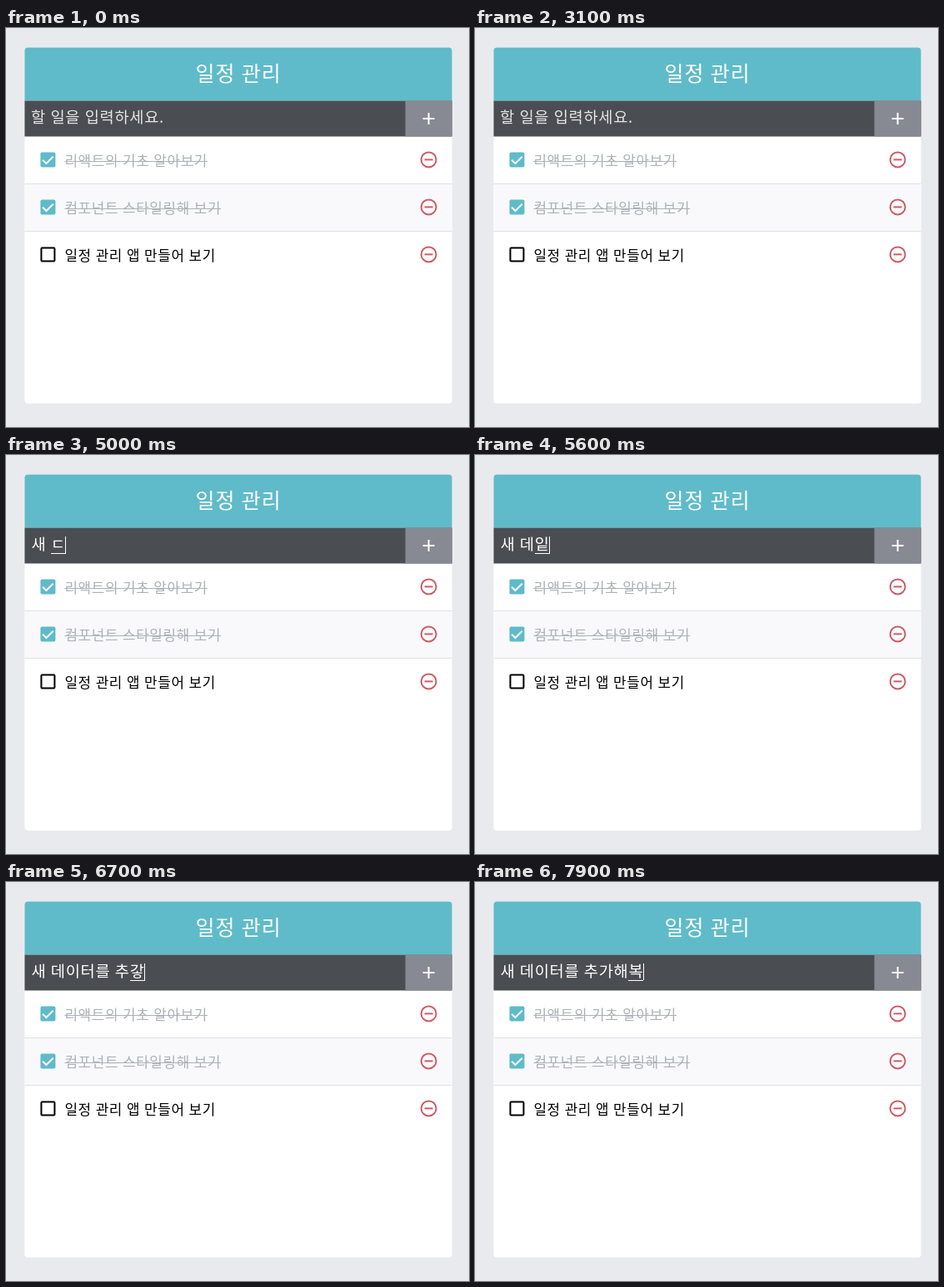
Recreate the animation shown at these times as an HTML page with a canvas. Size 556x480 px, loop 8000 ms.

```html
<!DOCTYPE html>
<html lang="ko">
<head>
<meta charset="utf-8">
<title>일정 관리</title>
<style>
  html, body { margin: 0; width: 100%; height: 100%; overflow: hidden; background: #e9eaee; }
  canvas { display: block; }
</style>
</head>
<body>
<canvas id="stage" width="556" height="480"></canvas>
<script>
const ctx = document.getElementById('stage').getContext('2d');
const LOOP = 8000;
const BLINK = 500;
const FOCUS = 2500;
const PLACEHOLDER = '할 일을 입력하세요.';

// Layout of the card
const LEFT = 22.4, RIGHT = 535.6, WIDTH = RIGHT - LEFT;
const TOP = 23.4, FORM = TOP + 64, LIST = FORM + 43;
const ROW = 57;
const ICON_X = RIGHT - 28;

const todos = [
  { text: '리액트의 기초 알아보기', done: true },
  { text: '컴포넌트 스타일링해 보기', done: true },
  { text: '일정 관리 앱 만들어 보기', done: false }
];

// Each key press: time, committed text, syllable still being composed
const keys = [
  [FOCUS, '', ''],
  [3300, '', 'ㅅ'],
  [3400, '', '새'],
  [3600, '새 ', ''],
  [3800, '새 ', 'ㄷ'],
  [4000, '새 ', '대'],
  [5000, '새 ', 'ㄷ'],
  [5200, '새 ', '데'],
  [5400, '새 ', '뎅'],
  [5500, '새 데', '이'],
  [5600, '새 데', '잍'],
  [5700, '새 데이', '터'],
  [5900, '새 데이', '털'],
  [6000, '새 데이터', '를'],
  [6100, '새 데이터를 ', ''],
  [6300, '새 데이터를 ', 'ㅊ'],
  [6400, '새 데이터를 ', '추'],
  [6500, '새 데이터를 ', '축'],
  [6600, '새 데이터를 추', '가'],
  [6700, '새 데이터를 추', '갛'],
  [6800, '새 데이터를 추가', '해'],
  [7300, '새 데이터를 추가', '햅'],
  [7700, '새 데이터를 추가해', '보'],
  [7900, '새 데이터를 추가해', '복']
];

function rect(x, y, w, h, color, radii = 0) {
  ctx.fillStyle = color;
  ctx.beginPath();
  ctx.roundRect(x, y, w, h, radii);
  ctx.fill();
}

function label(text, x, y, size, color) {
  ctx.font = `${size}px "Noto Sans CJK KR", "Noto Sans CJK", "Noto Sans CJK JP", sans-serif`;
  ctx.letterSpacing = size * 0.037 + 'px';
  ctx.wordSpacing = size * 0.033 + 'px';
  ctx.fillStyle = color;
  ctx.fillText(text, x, y);
  return ctx.measureText(text).width;
}

function line(points, color, width) {
  ctx.strokeStyle = color;
  ctx.lineWidth = width;
  ctx.beginPath();
  points.forEach(([x, y]) => ctx.lineTo(x, y));
  ctx.stroke();
}

function checkbox(cx, cy, done) {
  if (done) {
    rect(cx - 9, cy - 9, 18, 18, '#5fbbc9', 2);
    line([[cx - 6.3, cy + 0.3], [cx - 2, cy + 4.6], [cx + 6.3, cy - 3.7]], '#fff', 2);
  } else {
    ctx.strokeStyle = '#000';
    ctx.lineWidth = 2;
    ctx.beginPath();
    ctx.roundRect(cx - 8, cy - 8, 16, 16, 1);
    ctx.stroke();
  }
}

function removeIcon(cx, cy) {
  const color = '#cf5b66';
  ctx.strokeStyle = color;
  ctx.lineWidth = 2;
  ctx.beginPath();
  ctx.arc(cx, cy, 9, 0, Math.PI * 2);
  ctx.stroke();
  line([[cx - 5, cy], [cx + 5, cy]], color, 2);
}

function drawItem({ text, done }, i) {
  const top = LIST + i * ROW;
  const cy = top + 28;
  const x = LEFT + 48;
  if (i % 2) rect(LEFT, top, WIDTH, ROW, '#f9f9fb');
  if (i) rect(LEFT, Math.floor(top), WIDTH, 1, '#dfe1e4');
  checkbox(LEFT + 28, cy, done);
  const width = label(text, x, top + 35.2, 16.9, done ? '#adb1b7' : '#000');
  if (done) rect(x, Math.round(cy + 1.5), width, 1, '#adb1b7');
  removeIcon(ICON_X, cy);
}

function drawInput(t) {
  const key = keys.findLast(k => k[0] <= t);
  const [time, fixed, composing] = key || [0, '', ''];
  const text = fixed + composing;
  const x = LEFT + 8, base = 114, size = 18.7;
  if (!text) label(PLACEHOLDER, x - 0.4, base, size, '#e4e5e7');
  const width = label(text, x, base, size, '#fff');
  if (composing) {
    const w = ctx.measureText(composing).width;
    rect(Math.round(x + width - w), 118, Math.round(w), 1, '#fff');
  }
  const lit = Math.floor((t - time) / BLINK) % 2 === 0;
  if (key && lit) rect(Math.floor(x + width), 98, 1, 20, '#fff');
}

function draw(t) {
  rect(0, 0, 556, 480, '#e9eaee');
  rect(LEFT, TOP, WIDTH, 428.4, '#fff', 4);
  rect(LEFT, TOP, WIDTH, 64, '#5fbbc9', [4, 4, 0, 0]);
  label('일정 관리', 227.6, 64.2, 25, '#fff');
  rect(LEFT, FORM, WIDTH, 43, '#4a4d52');
  rect(RIGHT - 56, FORM, 56, 43, '#878a93');
  const plusY = FORM + 21.6;
  rect(ICON_X - 7, plusY - 1, 14, 2, '#fff');
  rect(ICON_X - 1, plusY - 7, 2, 14, '#fff');
  drawInput(t);
  todos.forEach(drawItem);
}

const start = performance.now();
function frame() {
  draw((performance.now() - start) % LOOP);
  requestAnimationFrame(frame);
}
frame();
</script>
</body>
</html>
```
